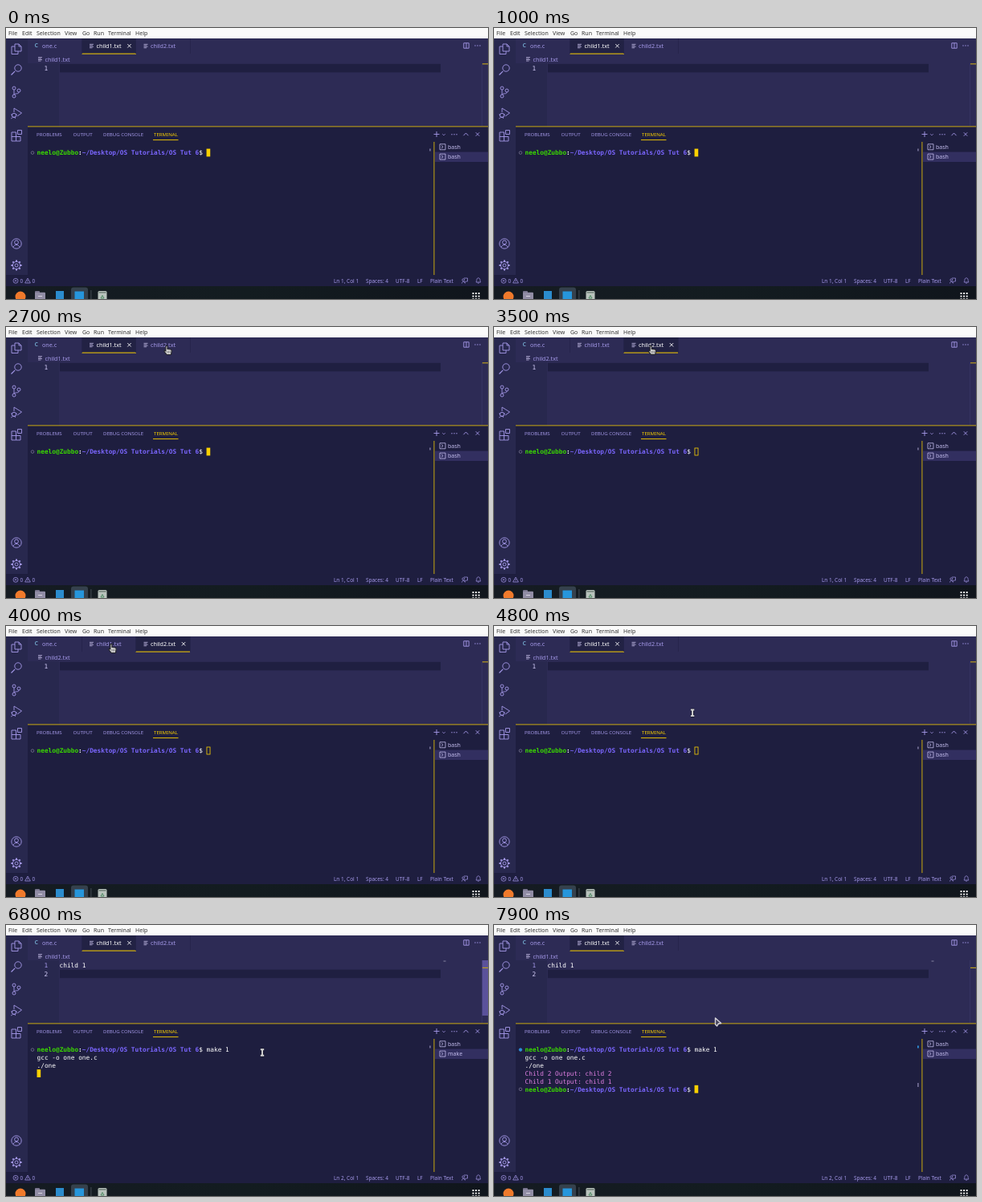
Write an HTML page with a canvas that moves like this. It is 600 by 338 pixels and loops after 8000 ms.

```html
<!DOCTYPE html>
<html lang="en">
<head>
<meta charset="utf-8">
<title>Terminal demo</title>
<style>
html, body { margin: 0; width: 100%; height: 100%; overflow: hidden; background: #1e1e3f; }
canvas { display: block; }
</style>
</head>
<body>
<canvas width="600" height="338"></canvas>
<script>
const g = document.querySelector('canvas').getContext('2d');
const LOOP = 8000;
const SANS = '"Noto Sans", "Open Sans", sans-serif';
const MONO = '"DejaVu Sans Mono", monospace';
const LILAC = '#a599e9', YELLOW = '#fad000', DARK = '#1e1e3f', EDITOR = '#2d2b55', SIDE = '#28284e';
const CELL = 4.69, LINE = 9.85;

// Event times in ms
const OPEN_SECOND = 2900, OPEN_FIRST = 4300, FOCUS_TERMINAL = 5300;
const TYPE_START = 5800, RUN = 6500, EXEC = 6700, DONE = 7300;
const PATH = [[1700, 356, 179], [1900, 356, 179], [2550, 202, 29], [3400, 202, 29],
  [4000, 133, 28], [4400, 133, 28], [5100, 319, 159], [7300, 319, 159], [7850, 278, 121]];

function rect(color, x, y, w, h) {
  g.fillStyle = color;
  g.fillRect(x, y, w, h);
}

function text(str, x, mid, color = LILAC, size = 7.2, font = SANS, weight = '') {
  g.font = `${weight} ${size}px ${font}`;
  g.fillStyle = color;
  g.fillText(str, x, mid + size * 0.35);
}

const mono = (str, x, mid, color = '#fff', weight = '') => text(str, x, mid, color, 7.8, MONO, weight);

// Path data is relative to x, y
function shape(d, x, y, stroke = LILAC, width = 0.9, fill) {
  const p = new Path2D(d);
  g.save();
  g.translate(x, y);
  if (fill) { g.fillStyle = fill; g.fill(p); }
  if (stroke) { g.strokeStyle = stroke; g.lineWidth = width; g.stroke(p); }
  g.restore();
}

function disc(x, y, r, fill, stroke, width = 0.9) {
  g.beginPath();
  g.arc(x, y, r, 0, 7);
  if (fill) { g.fillStyle = fill; g.fill(); }
  if (stroke) { g.strokeStyle = stroke; g.lineWidth = width; g.stroke(); }
}

function rounded(color, x, y, w, h, r) {
  g.beginPath();
  g.roundRect(x, y, w, h, r);
  g.fillStyle = color;
  g.fill();
}

const listIcon = (x, y) => shape('M0-2.2H5M0-.7H4M0 .8H5M0 2.3H3.5', x, y, '#b5afd8', 0.8);
const cross = (x, y, color) => shape('M-2.2-2.2L2.2 2.2M2.2-2.2L-2.2 2.2', x, y, color);
const dots = (x, y) => [-3, 0, 3].forEach(d => disc(x + d, y, 0.7, LILAC));

function menu() {
  rect('#fafafa', 0, 0, 600, 13);
  [['File', 3], ['Edit', 20], ['Selection', 38], ['View', 73], ['Go', 95], ['Run', 109],
    ['Terminal', 127], ['Help', 161]].forEach(([s, x]) => text(s, x, 6.8, '#333', 7));
}

function activityBar() {
  rect(SIDE, 0, 13, 27, 295);
  shape('M-2-6H3L6-3V3H-2ZM3-6V-3H6M-2-3H-6V6.5H2V3', 13, 26);
  shape('M-1.8 1.8L-6.5 6.5', 13, 52, LILAC, 1.1);
  disc(15, 50, 4.2, null, LILAC);
  [[10, 75], [10, 85], [16, 78]].forEach(([x, y]) => disc(x, y, 2, null, LILAC));
  shape('M-3-3V3M3 0C3 3-2 1-3 3', 13, 80);
  shape('M-3-1V-6L6.5 0L1 4', 13, 106);
  disc(10, 109, 2.7, null, LILAC);
  shape('M-7 0H-5M-7 5L-5 4M-1 0H1M-1 5L-2 4M-5 3H-1', 13, 108, LILAC, 0.7);
  shape('M-6-4H-.5V7H-6ZM-6 1.5H5V7H-.5M1.5-6.5H6.5V-1.5H1.5Z', 13, 134);
  disc(13, 269, 6.2, null, LILAC);
  disc(13, 267.3, 2.4, null, LILAC);
  shape('M-4 4.5C-3 .5 3 .5 4 4.5', 13, 269);
  disc(13, 296, 2, null, LILAC);
  disc(13, 296, 4.6, null, LILAC);
  for (let i = 0; i < 8; i++) {
    const c = Math.cos(i * Math.PI / 4), s = Math.sin(i * Math.PI / 4);
    shape(`M${c * 4.6} ${s * 4.6}L${c * 6.6} ${s * 6.6}`, 13, 296, LILAC, 2);
  }
}

function editor(t) {
  const second = t >= OPEN_SECOND && t < OPEN_FIRST;
  const filled = t >= EXEC;
  rect(EDITOR, 27, 13, 573, 110);
  rect(SIDE, 27, 44, 39, 79);

  const left = second ? 161.5 : 94.5;
  rect('#222244', left, 13, 67.5, 19);
  rect(YELLOW, left, 31.6, 67.5, 1);
  [94, 161, 229].forEach(x => rect('#25244a', x, 13, 0.8, 19));
  text('C', 35.5, 22, '#6d9fc4', 7, SANS, 'bold');
  text('one.c', 45, 22.5);
  listIcon(104, 22.5);
  text('child1.txt', 112.5, 22.5, second ? LILAC : '#fff');
  listIcon(171.5, 22.5);
  text('child2.txt', 180, 22.5, second ? '#fff' : LILAC);
  cross(second ? 221 : 153.5, 22.3, '#fff');
  shape('M-3.2-3.2H3.2V3.2H-3.2ZM0-3.2V3.2', 573, 22);
  dots(587, 22);

  listIcon(40, 38.8);
  text(second ? 'child2.txt' : 'child1.txt', 48.5, 39);

  const row = filled ? 1 : 0;
  rect('#1f1f41', 67, 44.8 + row * 10.8, 474, 10.6);
  mono('1', 47.5, 50, filled ? LILAC : '#d4cdf8');
  if (filled) {
    mono('2', 47.5, 60.9, '#d4cdf8');
    mono('child 1', 66.5, 49.8);
    rect('#8d8ba8', 544.5, 44.6, 3, 0.9);
    // The scrollbar shows after the file changes, then fades
    g.globalAlpha = Math.max(0, Math.min(1, (7700 - t) / 500));
    rect('#5b529b', 592.5, 44, 7.5, 69);
    g.globalAlpha = 1;
  }
  rect('#3a3768', 592, 44, 0.7, 78);
  rect('#b99d20', 593, filled ? 52.8 : 44.2, 7, 1.2);
}

function prompt(y, color, solid) {
  disc(33, y, 1.8, solid ? color : null, color, 0.8);
  mono('neelo@Zubbo', 38.5, y, '#3ad900', 'bold');
  mono(':', 38.5 + 11 * CELL, y, '#fff', 'bold');
  mono('~/Desktop/OS Tutorials/OS Tut 6', 38.5 + 12 * CELL, y, '#7b66ff', 'bold');
  mono('$', 38.5 + 43 * CELL, y);
}

function block(col, y, focused) {
  const x = 38.5 + col * CELL;
  if (focused) return rect(YELLOW, x, y - 5, CELL, 9.8);
  g.strokeStyle = YELLOW;
  g.lineWidth = 0.8;
  g.strokeRect(x + 0.4, y - 4.6, CELL - 0.6, 9);
}

function panel(t) {
  rect(DARK, 27, 123, 573, 186);
  rect('#c9a90f', 27, 122.4, 573, 1);
  [['PROBLEMS', 38], ['OUTPUT', 83.5], ['DEBUG CONSOLE', 121]]
    .forEach(([s, x]) => text(s, x, 133, LILAC, 6.1));
  text('TERMINAL', 184, 133, YELLOW, 6.1);
  rect(YELLOW, 183, 139.2, 31.5, 0.9);

  shape('M-3.5 0H3.5M0-3.5V3.5', 536, 132.5);
  shape('M-1.8-.9L0 .9L1.8-.9', 545, 133, LILAC, 0.7);
  dots(558, 132.7);
  shape('M-3 1.7L0-1.5L3 1.7', 572.5, 132.5);
  cross(587, 132.5, LILAC);

  rect('#322f60', 534, 154.6, 66, 12.4);
  rect('#c9a90f', 532.4, 142, 1, 166);
  const running = t >= RUN && t < DONE;
  ['bash', running ? 'make' : 'bash'].forEach((s, i) => {
    const y = 148.3 + i * 12.3;
    shape('M-3.5-3.5H3.5V3.5H-3.5ZM-1.5-1.8L.6 0L-1.5 1.8', 543.5, y, '#c4bdee', 0.8);
    text(s, 550, y + 0.3, '#c4bdee', 7);
  });

  const y0 = 155.6, done = t >= DONE;
  rect(done ? '#2f8fd8' : '#6f6a91', 527, 150.5, 1.8, 3);
  prompt(y0, done ? '#2f8fd8' : '#777391', done);
  const typed = 'make 1'.slice(0, Math.max(0, Math.floor((t - TYPE_START) / 100) + 1));
  mono(typed, 38.5 + 45 * CELL, y0);

  if (t < RUN) {
    block(45 + typed.length, y0, t < OPEN_SECOND || t >= FOCUS_TERMINAL);
    return;
  }
  mono('gcc -o one one.c', 38.5, y0 + LINE);
  if (t >= EXEC) mono('./one', 38.5, y0 + 2 * LINE);
  if (done) {
    mono('Child 2 Output: child 2', 38.5, y0 + 3 * LINE, '#e07fe2');
    mono('Child 1 Output: child 1', 38.5, y0 + 4 * LINE, '#e07fe2');
    prompt(y0 + 5 * LINE, '#777391');
    block(45, y0 + 5 * LINE, true);
    rect('#6f6a91', 527, 197, 1.8, 5);
  } else {
    block(0, y0 + (t >= EXEC ? 3 : 2) * LINE, true);
  }
}

function statusBar(t) {
  rect(DARK, 0, 308.5, 600, 13.5);
  disc(12, 315.3, 3, null, LILAC, 0.7);
  shape('M-1.2-1.2L1.2 1.2M1.2-1.2L-1.2 1.2', 12, 315.3, LILAC, 0.7);
  shape('M0-3L3.4 3H-3.4ZM0-1V1.2M0 1.8V2.4', 27, 315, LILAC, 0.7);
  [['0', 17.5], ['0', 32.5], [`Ln ${t >= EXEC ? 2 : 1}, Col 1`, 408], ['Spaces: 4', 448],
    ['UTF-8', 485], ['LF', 512], ['Plain Text', 528]].forEach(([s, x]) => text(s, x, 315.3, LILAC, 6.45));
  shape('M-1-3H3.5V1H1.5L0 2.5V1M-3.5 3.5C-3 .5 0 .5 .5 3.5', 571, 315, LILAC, 0.7);
  disc(569.3, 314.2, 1.4, null, LILAC, 0.7);
  shape('M-3 2C-1.5 .5-3-3 0-3.2C3-3 1.5 .5 3 2ZM-1 2.5C-.6 3.8 .6 3.8 1 2.5', 588, 315, LILAC, 0.7);
}

function dock() {
  const bg = g.createLinearGradient(0, 0, 600, 0);
  bg.addColorStop(0, '#151b22');
  bg.addColorStop(0.5, '#131c20');
  bg.addColorStop(1, '#10151c');
  rect(bg, 0, 322, 600, 16);
  rounded('#35414d', 81, 323.5, 21, 20, 3);
  disc(18, 335, 6.5, '#f07a2b');
  rounded('#77738c', 36, 328, 6, 5, 1);
  rounded('#918da5', 36, 329.8, 13, 12, 1);
  rect('#d7d4df', 40, 334, 5, 1);
  rect('#2b8ccd', 62, 328, 10, 12);
  rect('#2696dc', 85.5, 328.5, 11.5, 12);
  rect('#515861', 105.5, 327, 0.8, 11);
  rounded('#b9c3bd', 114.5, 328, 11, 13, 1.5);
  rect('#6d7b73', 115.5, 329.2, 9, 1.4);
  shape('M-2 2L0-1.5L2 2Z', 120, 335, '#4f8b65', 1);
  for (let i = 0; i < 9; i++) rect('#eee', 580.5 + i % 3 * 3.6, 330 + Math.floor(i / 3) * 3.6, 2, 2);
}

function pointerAt(t) {
  const i = PATH.findIndex(k => k[0] > t);
  if (i < 0) return PATH.at(-1).slice(1);
  const [t0, x0, y0] = PATH[i - 1], [t1, x1, y1] = PATH[i];
  const e = (1 - Math.cos(Math.PI * (t - t0) / (t1 - t0))) / 2;
  return [x0 + (x1 - x0) * e, y0 + (y1 - y0) * e];
}

function pointer(t) {
  if (t < PATH[0][0]) return;
  const [x, y] = pointerAt(t);
  g.lineJoin = 'round';
  if (y < 44) {
    shape('M-3.2-4.5C-3.2-6-1-6-1-4.5V-1.5L3-1C4.2-.8 4.3 0 4.2 1L3.5 5.5H-2L-5 1.5C-5.2 0-4 0-3.2 1Z',
      x, y, '#24242c', 1.2, '#d0d0d0');
    shape('M.5 1V3.5M2.2 1V3.5M-1.2 1V3.5', x, y, '#55555c', 0.6);
  } else if (y > 116 && y < 142) {
    shape('M-3-5L4.2 1.5L1 2L-1 5L-3 3Z', x + 0.5, y, '#d2d0d8', 1.4, '#46445c');
  } else {
    const beam = 'M-2.2-3.8H2.2M0-3.8V3.8M-2.2 3.8H2.2';
    shape(beam, x, y, '#15152a', 3.4);
    shape(beam, x, y, '#d4d4d4', 1.9);
  }
  g.lineJoin = 'miter';
}

function draw() {
  const t = performance.now() % LOOP;
  editor(t);
  panel(t);
  activityBar();
  menu();
  statusBar(t);
  dock();
  pointer(t);
  requestAnimationFrame(draw);
}
draw();
</script>
</body>
</html>
```
